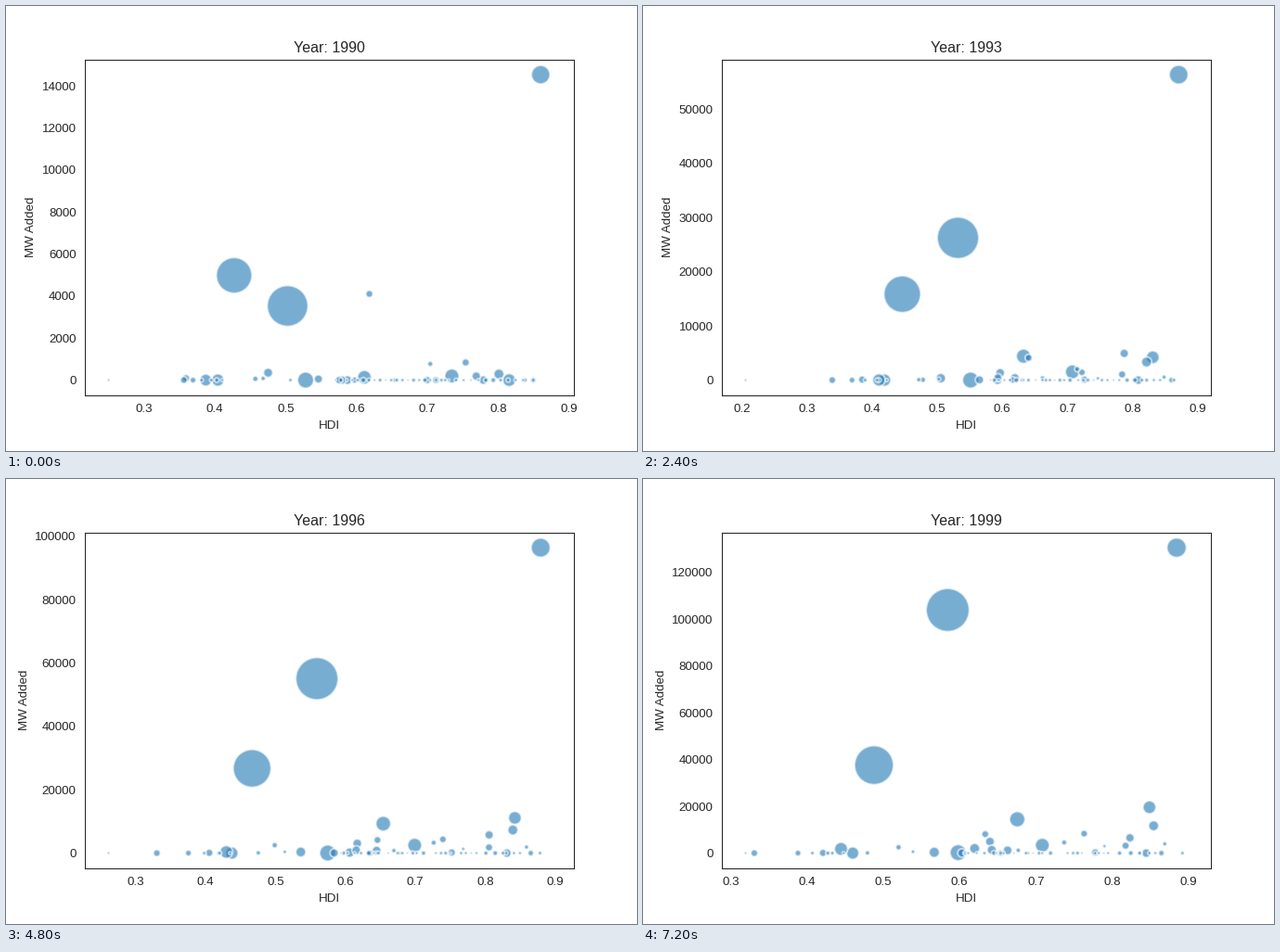
Write a matplotlib script that moves like this. It is 680x480 px and loops after 8 s.

```python
import numpy as np
import matplotlib.pyplot as plt
from matplotlib.animation import FuncAnimation

DPI = 80
PX = 72 / DPI  # points per pixel
INK = "0.15"
FRAMES = 10
T = np.arange(FRAMES)
U = T / (FRAMES - 1)

plt.rcParams.update({
    "font.family": "Liberation Sans", "font.size": 40 / 3 * PX,
    "axes.titlesize": 16 * PX, "axes.titlepad": 8 * PX,
    "axes.labelpad": 5.33 * PX, "axes.linewidth": 1.07 * PX,
    "axes.edgecolor": INK, "axes.labelcolor": INK, "text.color": INK,
    "xtick.color": INK, "ytick.color": INK,
    "xtick.major.size": 0, "ytick.major.size": 0,
    "xtick.major.pad": 9.33 * PX, "ytick.major.pad": 9.33 * PX,
})


def keys(points):
    return np.interp(T, list(points), list(points.values()))


def drift(start, end, bow=0):
    """Steady change, bent by `bow` halfway through."""
    return start + (end - start) * U + bow * np.sin(np.pi * U)


def grow(start, end, power=1):
    return start + (end - start) * U ** power


bubbles = []


def bubble(size, hdi, mw=0):
    size, hdi, mw = np.broadcast_arrays(size, hdi, mw, T)[:3]
    bubbles.append((size, hdi, mw))


left = keys({0: .2162, 1: .1918, 2: .1761, 4: .1624, 5: .1993, 7: .2554, 9: .2878})
right = keys({0: .9069, 1: .9088, 2: .9162, 4: .9246, 9: .93})
peak = keys({0: 14530, 1: 32370, 4: 68360, 5: 83850, 7: 108970, 9: 130600})

# The three large growers
bubble(grow(44, 46.5), drift(.5025, .5844, .0025),
       keys({0: 3528, 1: 6100, 2: 17660, 5: 43440, 7: 66700, 9: 103950}))
bubble(grow(38.5, 42), drift(.427, .4876, -.001), grow(4983, 37620))
bubble(grow(20, 21), drift(.860, .885, .003), peak)

# Countries that add capacity
bubble(14, drift(.8155, .8493, .005), grow(0, 19600, 1.4))
bubble(11, drift(.801, .8548, .003), grow(287, 11680, 1.2))
bubble(9.3, drift(.769, .8237), np.where(T < 2, 190, 4130 + 267 * T))
bubble(8, drift(.754, .818, .01), grow(838, 3168, 2.2))
bubble(15.3, drift(.7345, .7086, -.021), grow(198, 3366, .8))
bubble(grow(15, 16.7), drift(.611, .6757), grow(132, 14450, 1.1))
bubble(7.7, drift(.618, .6337, .02), grow(4100, 8100, 12))
bubble(5.7, drift(.704, .7373), grow(772, 4554))
bubble(7.5, drift(.712, .7635, -.008), grow(0, 8316, 1.6))
bubble(9.7, drift(.579, .6398, -.003), grow(0, 4950, 1.2))
bubble(grow(8, 10), drift(.575, .6422, -.005), grow(0, 1386))
bubble(9.7, drift(.587, .663, .008), grow(0, 1188))
bubble(grow(9, 11), drift(.579, .6197), grow(0, 1980, 6))
bubble(grow(10, 11.3), drift(.475, .5667), 350)
bubble(6, drift(.457, .5198), np.where(T < 4, 60, 2500))
bubble(grow(13, 14.3), drift(.387, .4443, .005), grow(0, 1780, 4))
bubble(5, drift(.654, .677), grow(0, 1200))
bubble(4.7, drift(.838, .8694), grow(0, 3960, 1.8))
bubble(3.7, drift(.725, .7902), grow(0, 2970, 2))
bubble(4, drift(.5065, .5387, -.017), grow(0, 594))

# Countries that stay near zero
bubble(17.5, drift(.528, .598), grow(0, 200, 4))
bubble(13.5, drift(.404, .4596, -.004))
bubble(9.5, drift(.779, .845, .009))
bubble(9, drift(.546, .603), 50)
bubble(8, drift(.359, .4206, .006), 90)
bubble(8, drift(.700, .778), grow(0, 300))
bubble(7.5, drift(.356, .3304, -.01))
bubble(7, drift(.597, .654))
bubble(6.5, drift(.369, .3877, -.007))
bubble(6.2, drift(.8495, .865, .006))
bubble(4, drift(.8495, .8926))
bubble(5, drift(.468, .479), 80)
bubble(4, drift(.381, .4066))
bubble(2.7, left + .0484 * (right - left))

# Small specks, bunched along the baseline
rng = np.random.default_rng(7)
for low, high, count in ((.395, .41, 3), (.57, .72, 20), (.73, .835, 11)):
    for start in np.linspace(low, high, count):
        bubble(rng.uniform(2, 5.5), drift(start, start + rng.uniform(.02, .04)))

bubbles.sort(key=lambda b: -b[0][0])
size, hdi, mw = np.array(bubbles).transpose(1, 0, 2)

fig = plt.figure(figsize=(8.5, 6), dpi=DPI, facecolor="white")
ax = fig.add_axes([.125, .125, .775, .755])
ax.set_xlabel("HDI")
ax.set_ylabel("MW Added")
title = ax.set_title("")
dots = ax.scatter(hdi[:, 0], mw[:, 0], c="#1f77b4", alpha=.6,
                  edgecolors="white", linewidths=2 * PX)


def update(i):
    dots.set_offsets(np.column_stack([hdi[:, i], mw[:, i]]))
    dots.set_sizes((size[:, i] * PX) ** 2)
    ax.set_xlim(left[i], right[i])
    ax.set_ylim(-.05 * peak[i], 1.05 * peak[i])
    title.set_text(f"Year: {1990 + i}")
    return dots, title


anim = FuncAnimation(fig, update, frames=FRAMES, interval=800,
                     repeat=True, repeat_delay=0, blit=False)
plt.show()
```
